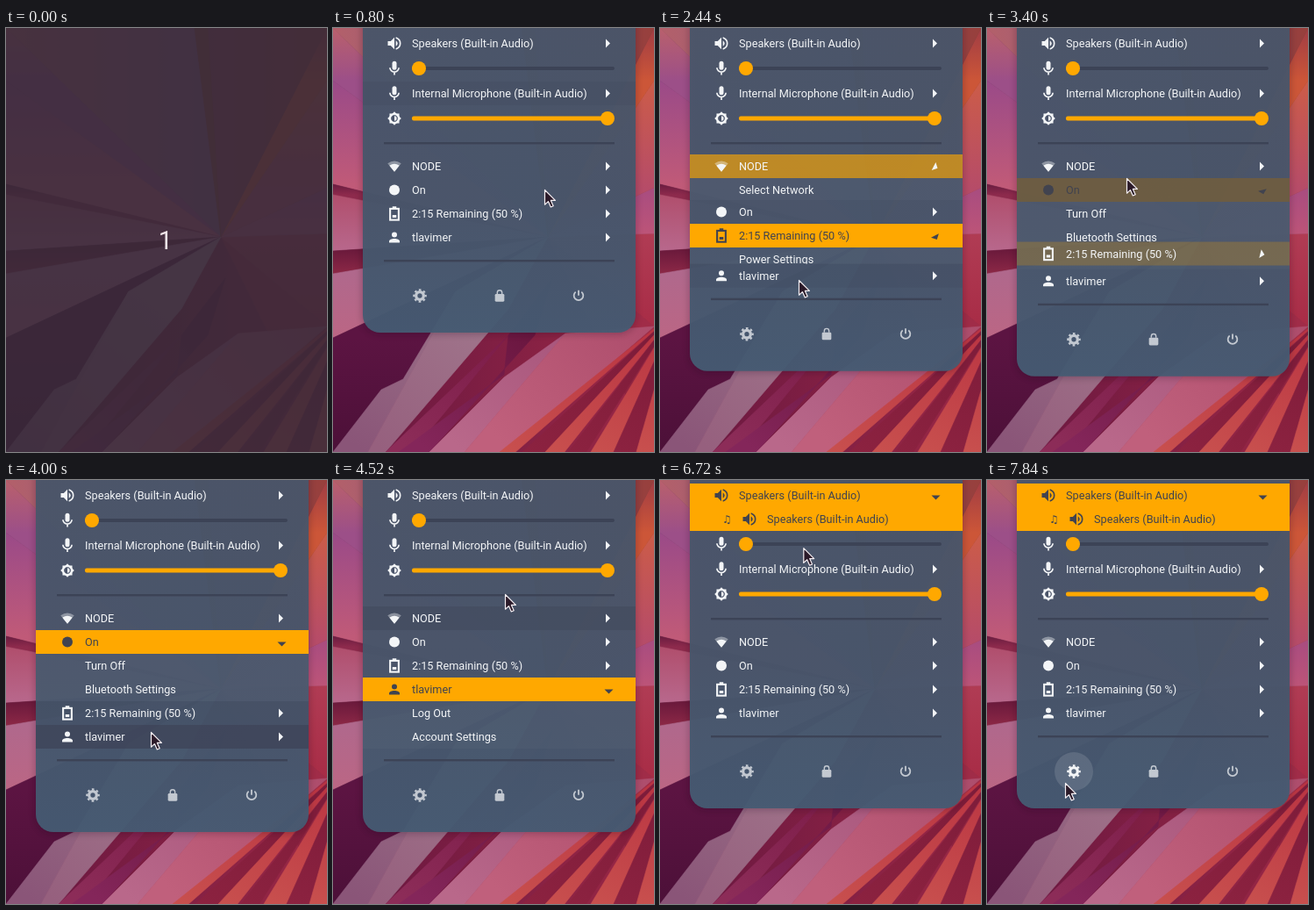
Recreate the animation shown at these times as an HTML page. Size 366 by 483 pixels, loop 8 s.

```html
<!DOCTYPE html>
<html lang="en">
<head>
<meta charset="utf-8">
<title>System menu</title>
<style>
html, body { margin: 0; width: 100%; height: 100%; overflow: hidden; background: #3a2a36; }
#stage { display: block; width: 366px; height: 483px; }
text { font: 12.7px Roboto, sans-serif; }
</style>
</head>
<body>
<svg id="stage" viewBox="0 0 366 483" xmlns="http://www.w3.org/2000/svg">
  <defs>
    <filter id="soft" x="-20%" y="-20%" width="140%" height="140%"><feGaussianBlur stdDeviation="4"/></filter>
    <linearGradient id="slate" x1="0" y1="0" x2="0" y2="1">
      <stop offset="0" stop-color="#4a566a"/><stop offset=".6" stop-color="#47566b"/><stop offset="1" stop-color="#455b73"/>
    </linearGradient>
  </defs>
  <g id="wall"></g>
  <g id="menu">
    <rect id="shade" x="34" y="-30" width="311" rx="20" fill="#140818" opacity=".3" filter="url(#soft)"/>
    <rect id="panel" x="34" y="-30" width="311" rx="20" fill="url(#slate)" fill-opacity=".95"/>
  </g>
  <path id="cursor" d="M.5 .5V17.2L4.4 13.6 7.3 20 10.2 18.7 7.4 12.4H12.4Z" fill="#2b1a29" stroke="#f4eef2" stroke-width="1.2" stroke-linejoin="round"/>
  <g id="count">
    <rect width="366" height="483" fill="#362a38" opacity=".86"/>
    <text x="182" y="252" text-anchor="middle" style="font-size:29px" fill="#efe4e8">1</text>
  </g>
</svg>
<script>
const NS = 'http://www.w3.org/2000/svg', LOOP = 8000;
const ORANGE = '#ffa800', DARK = '#41434f', WHITE = '#f3f5f7', TRACK = '#3c4356', HOVER = '#3b3f52';
const $ = id => document.getElementById(id);
const clamp = v => Math.max(0, Math.min(1, v));
const set = (n, k, v) => n.setAttribute(k, v);

function add(parent, tag, attrs = {}, text) {
  const n = document.createElementNS(NS, tag);
  for (const k in attrs) set(n, k, attrs[k]);
  if (text) n.textContent = text;
  parent.appendChild(n);
  return n;
}

// Wallpaper: facets shaded from their first corner to their second
let facets = 0;
function facet(points, from, to) {
  const id = 'w' + facets++, [[x1, y1], [x2, y2]] = points;
  const g = add($('wall'), 'linearGradient', { id, gradientUnits: 'userSpaceOnUse', x1, y1, x2, y2 });
  add(g, 'stop', { 'stop-color': from });
  add(g, 'stop', { offset: 1, 'stop-color': to });
  const fill = `url(#${id})`;
  add($('wall'), 'polygon', { points: points.join(' '), fill, stroke: fill, 'stroke-width': .6 });
}
function paintWall() {
  const hub = [245, 238];
  const rim = [
    [215, 0, '#8a5a80', '#b3606a'], [0, 0, '#b9606c', '#9c4f88'], [0, 60, '#9a4a88', '#c05a78'],
    [0, 178, '#6a1c40', '#8d2a4c'], [0, 190, '#b04e6c', '#b8688c'], [0, 254, '#6c1a3c', '#8c2846'],
    [0, 280, '#b0688c', '#bb6684'], [0, 353, '#5c1442', '#4c1038'], [0, 483, '#641640', '#9c2846'],
    [366, 483, '#7c1a38', '#a02c48'], [366, 340, '#a82c46', '#b03c54'], [366, 234, '#bc5478', '#a84c80'],
    [366, 182, '#b64c68', '#cc5c48'], [366, 60, '#cc5638', '#a03c44'], [366, 0, '#98403c', '#8a4058'],
    [230, 0, '#8a4438', '#8a4438']
  ];
  rim.forEach(([x, y, from, to], i) => {
    const [nx, ny] = rim[(i + 1) % rim.length];
    facet([[x, y], [nx, ny], hub], from, to);
  });
  // Broad folds at the bottom
  facet([[140, 300], [40, 483], [0, 483], [55, 412], [80, 400]], '#9c7389', '#8a5578');
  facet([[200, 320], [60, 483], [40, 483], [140, 300], hub], '#a1788d', '#96607e');
  facet([[200, 350], [90, 483], [60, 483]], '#7c1c48', '#8c2c58');
  facet([[230, 350], [110, 483], [75, 483], [195, 395], [200, 350], [250, 285]], '#6a163f', '#84265a');
  facet([[265, 348], [150, 483], [110, 483], [195, 398]], '#a8567c', '#b9688a');
  facet([[366, 340], [200, 483], [150, 483], [265, 348]], '#ad4d6c', '#c0607c');
  // Thin red shards spreading from a point beyond the right edge
  let seed = 7;
  const rnd = () => (seed = seed * 16807 % 2147483647) / 2147483647;
  const at = k => [190 + 26 * k, 483];
  for (let k = 0; k < 8; k++) {
    const lit = k % 2 === 0, w = .7 + .5 * rnd();
    facet([[392, 322], at(k), at(k + w)], lit ? '#b83040' : '#7a1a38', lit ? '#c8504e' : '#8c2240');
  }
}

// Icons live in a 24-unit box
const stroked = (shape, w) => `<g fill="none" stroke="currentColor" stroke-width="${w}">${shape}</g>`;
const lockBody = '<rect x="4" y="9" width="16" height="13" rx="2"/>';
const icons = {
  speaker: '<path d="M3 9v6h4l5 5V4L7 9zM14 8v8q5-4 0-8z"/>' + stroked('<path d="M14 4.300q6 2 6 7.700t-6 7.700"/>', 2),
  mic: '<rect x="9" y="2" width="6" height="12" rx="3"/>' + stroked('<path d="M5.900 11a6.100 6 0 0 0 12.200 0M12 17v4"/>', 2),
  bright: stroked('<rect x="5" y="5" width="14" height="14"/><rect x="5" y="5" width="14" height="14" transform="rotate(45 12 12)"/><circle cx="12" cy="12" r="7.500"/>', 2.6)
    + '<path d="M12 8a4 4 0 0 1 0 8z"/>',
  wifi: '<path opacity=".4" d="M12 21.500 23.600 7Q12-1 .4 7z"/><path d="M12 21.500 20.500 11Q12 5 3.500 11z"/>',
  dot: '<circle cx="12" cy="12" r="9"/>',
  battery: '<path d="M9 1h6v3H9zM9 14h6v4H9z"/>' + stroked('<rect x="5.500" y="4.500" width="13" height="17"/>', 2.8),
  user: '<circle cx="12" cy="8" r="4"/><path d="M4 20v-2c0-5.300 16-5.300 16 0v2z"/>',
  gear: stroked('<circle cx="12" cy="12" r="6.500"/>', 5) + stroked('<circle cx="12" cy="12" r="10" stroke-dasharray="3.927" stroke-dashoffset="2"/>', 3.4),
  lock: lockBody + stroked('<path d="M8 9V6.500a4 4 0 0 1 8 0V9"/>', 2.200),
  power: stroked('<path d="M12 2.500v9M7 5.500a8 8 0 1 0 10 0"/>', 2.7)
};
const sizes = { speaker: 20, mic: 20, user: 18, battery: 18 };
function icon(parent, name, x, y, size = sizes[name] || 16) {
  const g = add(parent, 'g', { transform: `translate(${x - size / 2} ${y - size / 2}) scale(${size / 24})`, fill: 'currentColor' });
  g.innerHTML = icons[name];
}

// Menu content, top to bottom
const ROW = 27;
const row = (y, icon, label, ...sub) => ({ kind: 'row', y, icon, label, sub });
const parts = [
  row(4, 'speaker', 'Speakers (Built-in Audio)', 'Speakers (Built-in Audio)'),
  { kind: 'slider', icon: 'mic', value: 0, y: 46 },
  row(61, 'mic', 'Internal Microphone (Built-in Audio)'),
  { kind: 'slider', icon: 'bright', value: 1, y: 103 },
  { kind: 'line', y: 131 },
  row(144, 'wifi', 'NODE', 'Select Network', 'Turn Off', 'Wi-Fi Settings'),
  row(171, 'dot', 'On', 'Turn Off', 'Bluetooth Settings'),
  row(198, 'battery', '2:15 Remaining (50 %)', 'Power Settings'),
  row(225, 'user', 'tlavimer', 'Log Out', 'Account Settings'),
  { kind: 'line', y: 265 },
  { kind: 'buttons', y: 305 }
];
const SPEAKERS = 0, WIFI = 5, BLUE = 6, POWER = 7, USER = 8;
const buttons = [['gear', 99], ['lock', 190], ['power', 280]];

const band = (parent, x, height, fill) => add(parent, 'rect', { x, width: 311, height, fill });

const build = {
  row(p, i) {
    const audio = i === SPEAKERS, full = p.sub.length * ROW;
    p.hover = band(p.g, 34, ROW, HOVER);
    p.tints = [band(p.g, 34, ROW, ORANGE)];
    p.face = add(p.g, 'g', { fill: 'currentColor' });
    icon(p.face, p.icon, 70, 13.5);
    add(p.face, 'text', { x: 90, y: 18 }, p.label);
    p.arrow = add(p.face, 'path', { d: 'M0-5 5 0 0 5Z' });
    // The nested svg clips the submenu while it unfolds
    p.box = add(p.g, 'svg', { x: 34, y: ROW, width: 311, height: 0 });
    set(band(p.box, 0, full, '#fff'), 'opacity', .025);
    if (audio) p.tints.push(band(p.box, 0, full, ORANGE));
    p.items = p.sub.map((label, j) => {
      const g = add(p.box, 'g', { transform: `translate(-34 ${j * ROW})`, fill: audio ? DARK : WHITE, color: DARK });
      const hover = band(g, 34, ROW, audio ? 'none' : HOVER);
      if (audio) {
        add(g, 'text', { x: 71, y: 18, style: 'font:12px "DejaVu Sans",sans-serif' }, '♫');
        icon(g, 'speaker', 102, 13.5);
      }
      add(g, 'text', { x: audio ? 122 : 90, y: 18 }, label);
      return hover;
    });
  },
  slider(p) {
    const x = 98 + 215 * p.value;
    icon(p.g, p.icon, 70, 0);
    add(p.g, 'rect', { x: 90, y: -2, width: 231, height: 4, rx: 2, fill: TRACK });
    add(p.g, 'rect', { x: 90, y: -2.5, width: x - 90, height: 5, rx: 2, fill: ORANGE });
    add(p.g, 'circle', { cx: x, r: 8, fill: ORANGE });
  },
  line(p) {
    add(p.g, 'rect', { x: 58, y: -1, width: 263, height: 2.4, fill: TRACK });
  },
  buttons(p) {
    p.items = buttons.map(([name, x]) => {
      const glow = add(p.g, 'circle', { cx: x, r: 22, fill: '#fff' });
      const face = add(p.g, 'g');
      icon(face, name, x, 0);
      return { glow, face };
    });
  }
};

// [time, opened row, delay of its highlight]
const clicks = [[1540, WIFI, 0], [2330, POWER, 0], [3250, BLUE, 130], [4160, USER, 0], [4900, WIFI, 0], [5950, SPEAKERS, 0]];
// Pointer legs: [departure, arrival, x, y]
const legs = [[650, 800, 241, 184], [800, 1480, 172, 158], [1620, 2290, 158, 287], [2460, 3320, 159, 171], [3420, 3960, 165, 287],
  [4180, 4460, 196, 130], [4680, 4880, 190, 156], [5020, 5480, 183, 64], [5840, 5940, 180, 17], [6360, 7680, 89, 345]];

function pointer(t) {
  let x = 300, y = -24;
  for (const [from, to, tx, ty] of legs) {
    const u = clamp((t - from) / (to - from)), e = u * u * (3 - 2 * u);
    x += (tx - x) * e;
    y += (ty - y) * e;
  }
  return [x, y];
}

function unfold(i, t) {
  let v = 0;
  for (const [at, id] of clicks) {
    const e = 1 - (1 - clamp((t - at) / 250)) ** 2;
    v += ((id === i) - v) * e;
  }
  return v;
}

function highlight(i, t) {
  let v = 0, open = false;
  for (const [at, id, wait] of clicks) {
    if (t < at) break;
    open = id === i;
    if (open) v = clamp((t - at - wait) / 90);
    else v *= 1 - clamp((t - at - 75) / 100);
  }
  return { v, open };
}

function layout(t) {
  let shift = 0;
  const rows = parts.map((p, i) => {
    const f = p.sub ? unfold(i, t) : 0, h = p.sub ? f * ROW * p.sub.length : 0;
    const y = p.y + shift;
    shift += h;
    return { y, f, h };
  });
  return { rows, shift };
}

// Key of what lies under the pointer: a row, or an item within it
function hit(t) {
  const [x, y] = pointer(t), { rows } = layout(t);
  for (let i = 0; i < parts.length; i++) {
    const d = y - rows[i].y, { kind } = parts[i];
    if (kind === 'row' && d >= 0 && d < ROW) return i + '';
    if (kind === 'row' && d >= ROW && d < ROW + rows[i].h) return i + '.' + Math.floor(d / ROW - 1);
    if (kind === 'buttons') {
      const b = buttons.findIndex(k => Math.hypot(x - k[1], d) < 22);
      if (b >= 0) return i + '.' + b;
    }
  }
  return '';
}

function draw(t) {
  const { rows, shift } = layout(t), hovers = {};
  // Averaging recent hits fades the hover in and out
  for (let k = 0; k < 5; k++) {
    const key = hit(t - 60 - k * 20);
    hovers[key] = (hovers[key] || 0) + .2;
  }
  const hover = key => hovers[key] || 0;

  set($('count'), 'visibility', t < 40 ? 'visible' : 'hidden');
  set($('menu'), 'opacity', t < 400 ? 0 : clamp((t - 360) / 120));
  set($('panel'), 'height', 377 + shift);
  set($('shade'), 'height', 378 + shift);

  parts.forEach((p, i) => {
    const { y, f, h } = rows[i];
    set(p.g, 'transform', `translate(0 ${y})`);
    if (p.kind === 'row') {
      const { v, open } = highlight(i, t);
      set(p.hover, 'opacity', hover(i + '') * .75);
      p.tints.forEach(n => set(n, 'opacity', v));
      set(p.face, 'color', open ? DARK : WHITE);
      set(p.arrow, 'transform', `translate(${311 + 3.5 * f} 13.5) rotate(${90 * f})`);
      set(p.box, 'height', h);
      set(p.box, 'visibility', h > 0 ? 'visible' : 'hidden');
      p.items.forEach((n, j) => set(n, 'opacity', hover(i + '.' + j) * .75));
    } else if (p.kind === 'buttons') {
      p.items.forEach((n, j) => {
        const v = hover(i + '.' + j);
        set(n.glow, 'opacity', v * .12);
        set(n.face, 'opacity', .72 + .28 * v);
      });
    }
  });
  const [x, y] = pointer(t);
  set($('cursor'), 'transform', `translate(${x} ${y})`);
}

paintWall();
parts.forEach((p, i) => {
  p.g = add($('menu'), 'g', { color: WHITE });
  build[p.kind](p, i);
});

const start = performance.now();
function tick() {
  draw((performance.now() - start) % LOOP);
  requestAnimationFrame(tick);
}
draw(0);
tick();
</script>
</body>
</html>
```
